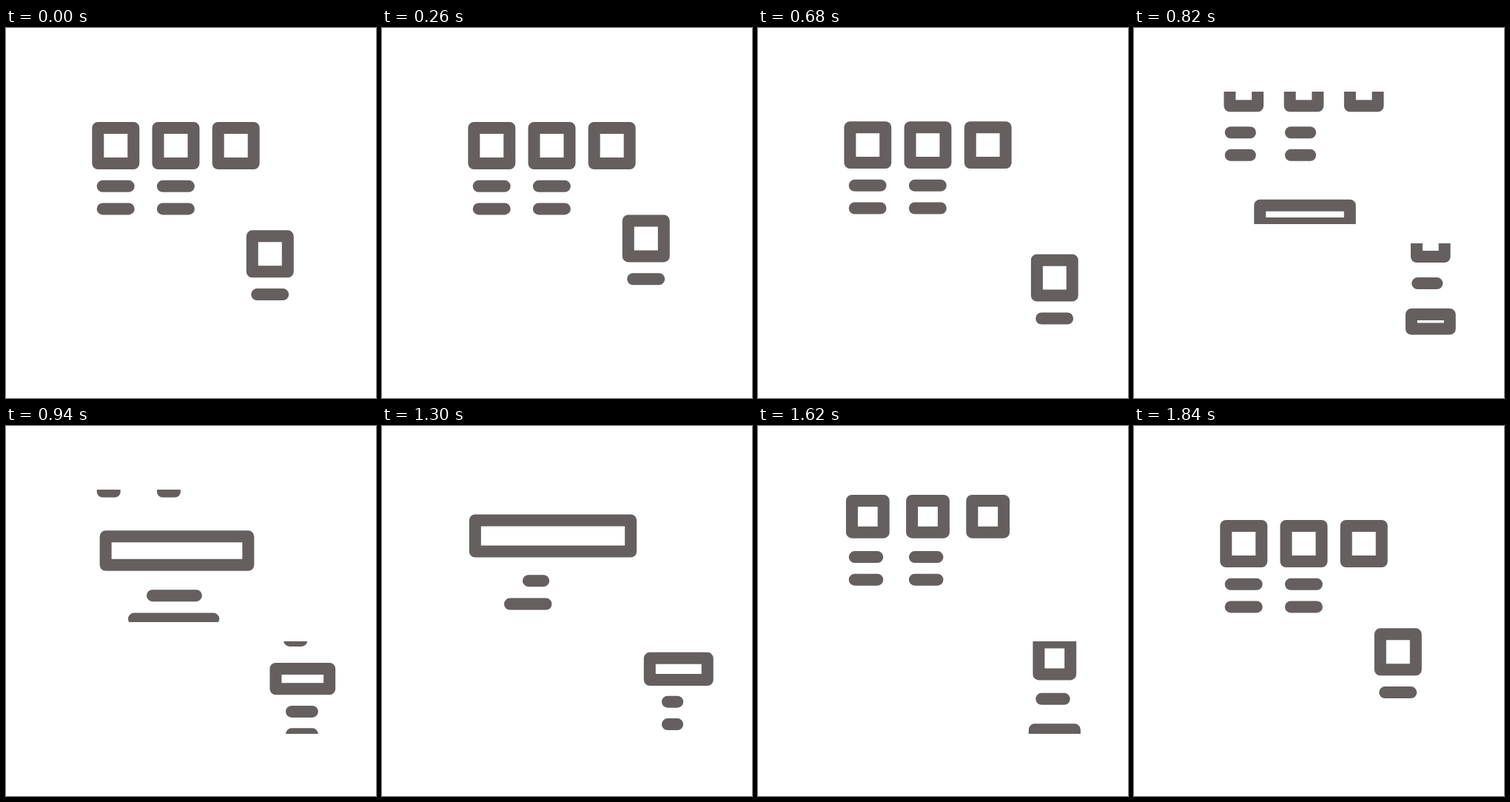
Recreate the animation shown at these times as an HTML page with a canvas. Size 500 by 500 pixels, loop 2000 ms.

```html
<!DOCTYPE html>
<html lang="en">
<head>
<meta charset="utf-8">
<title>Scrolling layouts</title>
<style>
  html, body { margin: 0; width: 100%; height: 100%; overflow: hidden; background: #fff; }
  canvas { display: block; width: 500px; height: 500px; }
</style>
</head>
<body>
<canvas id="stage" width="500" height="500"></canvas>
<script>
const ctx = document.getElementById('stage').getContext('2d');
const LOOP = 2000, STEP = 20;
const INK = '#665f5f';
const BAR_SHRINK = 0.62, SQUARE_SHRINK = 0.53;

const mix = (a, b, u) => a + (b - a) * u;

// Eased progress between two moments
function ease(t, from, to) {
  const u = Math.min(1, Math.max(0, (t - from) / (to - from)));
  return u * u * (3 - 2 * u);
}

// Outline scaled about its centre, with a constant line weight
function box(cx, cy, w, h, scale) {
  ctx.strokeRect(cx - w * scale / 2, cy - h * scale / 2, w * scale, h * scale);
}

function bar(x, y, length) {
  ctx.beginPath();
  ctx.moveTo(x, y);
  ctx.lineTo(x + length, y);
  ctx.stroke();
}

// A clipped view holding two pages that scroll vertically
function view(top, bottom, distance, scroll, first, second) {
  ctx.save();
  ctx.beginPath();
  ctx.rect(0, top, 500, bottom - top);
  ctx.clip();
  ctx.translate(0, -scroll * distance);
  if (scroll < 1) first(scroll);
  ctx.translate(0, distance);
  if (scroll > 0) second(1 - scroll);
  ctx.restore();
}

function column(cx, cy, rows, away) {
  box(cx, cy, 48, 48, 1 - SQUARE_SHRINK * away);
  for (let i = 0; i < rows; i++) {
    bar(cx - 17.6, cy + 54.8 + i * 30.6, 35 * (1 - BAR_SHRINK * away));
  }
}

// Where the small view stands, relative to its free place
function smallOffset(t) {
  if (t < 360) return [-44, -33 - 50 * ease(t, 180, 360)];
  if (t < 1660) {
    const u = ease(t, 360, 660);
    return [mix(-44, 0, u), mix(-83, 0, u)];
  }
  const u = ease(t, 1660, 1840);
  return [-44 * u, -33 * u];
}

function draw(t) {
  const scroll = ease(t, 665, 1020) - ease(t, 1260, 1768);
  const trim = ease(t, 1010, 1260);
  const arriving = t < 1260;

  ctx.fillStyle = '#fff';
  ctx.fillRect(0, 0, 500, 500);
  ctx.strokeStyle = INK;
  ctx.lineWidth = 16;
  ctx.lineJoin = ctx.lineCap = 'round';

  view(86, 265, 179, scroll,
    away => [2, 2, 0].forEach((rows, i) => column(148.3 + i * 81.2, 159, rows, away)),
    away => {
      const k = 1 - BAR_SHRINK * away;
      box(231, 145.4, 212.5, 42.5, 1 - (arriving ? 0.72 : 0.57) * away);
      bar(198, 206, mix(64, 20.4, trim) * k);
      bar(173, 237.4, mix(116.6, 49, trim) * k);
    });

  ctx.save();
  ctx.translate(...smallOffset(t));
  view(291, 416, 118.5, scroll,
    away => column(400.8, 338.3, 1, away),
    away => {
      const length = mix(30.3, 13.3, trim) * (1 - BAR_SHRINK * away);
      box(400.8, 326.3, 78.5, 29.4, 1 - (arriving ? 0.57 : 0.39) * away);
      bar(386, 370.6, length);
      bar(386, 401, length);
    });
  ctx.restore();
}

const start = performance.now();
function tick() {
  const t = (performance.now() - start) % LOOP;
  draw(t - t % STEP);
  requestAnimationFrame(tick);
}
tick();
</script>
</body>
</html>
```
